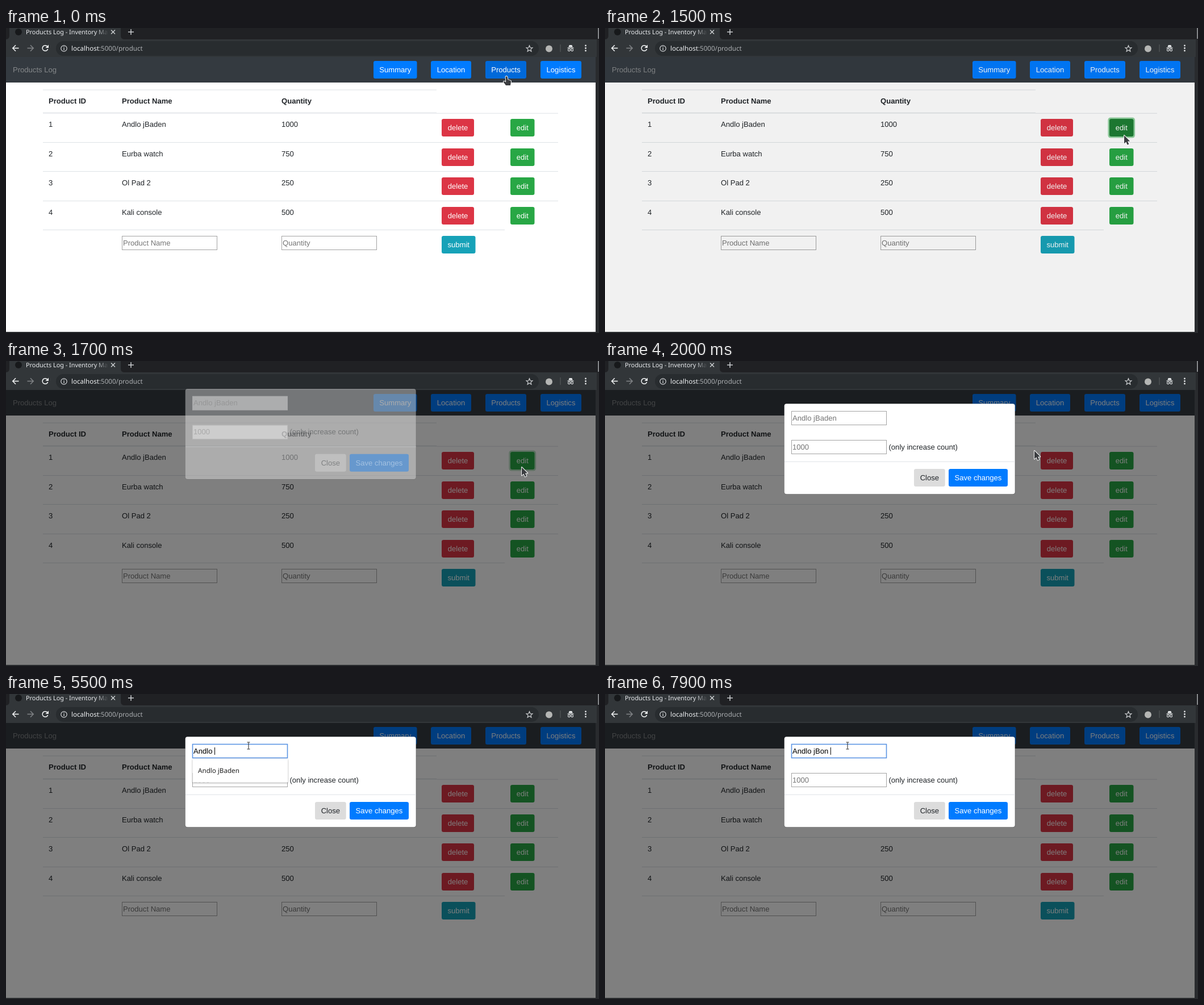
An HTML page with a canvas for the animation above (8000 ms loop, 1044 by 537 pixels).

```html
<!DOCTYPE html>
<html lang="en">
<head>
<meta charset="utf-8">
<title>Products Log</title>
<style>
html, body { margin: 0; width: 100%; height: 100%; overflow: hidden; background: #292b2e; }
canvas { display: block; }
</style>
</head>
<body>
<canvas id="stage" width="1044" height="537"></canvas>
<script>
const ctx = document.getElementById('stage').getContext('2d');
ctx.textRendering = 'geometricPrecision';

const LOOP = 8000, STEP = 100;
const SANS = '13.07px "Liberation Sans", Arial, sans-serif';
const BOLD = 'bold ' + SANS;
const NOTO = '"Noto Sans", sans-serif';
const INK = '#212529', HINT = '#757575', RULE = '#dee2e6';
const BLUE = [0, 123, 255], BLUE_HOVER = [0, 105, 217];
const GREEN = [40, 167, 69], GREEN_HOVER = [33, 136, 56], GREEN_DOWN = [30, 126, 52];
const RED = [220, 53, 69], TEAL = [23, 162, 184], GREY = [220, 220, 220];

const ROWS = [
  ['Andlo jBaden', '1000'],
  ['Eurba watch', '750'],
  ['Ol Pad 2', '250'],
  ['Kali console', '500']
];
const ALL = ['A', 'a product', 'Andlo jBaden', 'Eurba watch', 'Anor Velbune 2', 'Corveng TV'];
const WITH_A = ['A', 'a product', 'Andlo jBaden', 'Anor Velbune 2', 'a test'];

// [time, typed text]
const TYPING = [
  [4500, 'A'], [4900, 'And'], [5300, 'Andlo'], [5500, 'Andlo '], [6600, 'Andlo j'],
  [7100, 'Andlo jB'], [7500, 'Andlo jBo'], [7700, 'Andlo jBon'], [7900, 'Andlo jBon ']
];

// [time, x, y] of the pointer's hot spot
const PATH = [
  [0, 881, 85], [100, 882, 90], [200, 888, 107], [300, 900, 137], [400, 911, 168],
  [500, 917, 186], [600, 918, 190], [900, 918, 190], [1000, 914, 189], [1600, 914, 189],
  [1700, 908, 187], [1800, 882, 181], [1900, 828, 170], [2000, 756, 158], [2100, 637, 118],
  [2200, 560, 107], [2300, 508, 103], [2400, 487, 102], [2800, 487, 102], [2900, 427, 91]
];

const ramp = (t, a, b) => Math.min(1, Math.max(0, (t - a) / (b - a)));
const mix = (a, b, k) => a.map((v, i) => v + (b[i] - v) * k);
const rgb = c => `rgb(${c.map(Math.round).join(',')})`;

function rect(x, y, w, h, color) {
  ctx.fillStyle = color;
  ctx.fillRect(x, y, w, h);
}

function round(x, y, w, h, r, color) {
  ctx.beginPath();
  ctx.roundRect(x, y, w, h, r);
  ctx.fillStyle = color;
  ctx.fill();
}

function text(s, x, y, color = INK, font = SANS, align = 'left') {
  ctx.font = font;
  ctx.textAlign = align;
  ctx.fillStyle = color;
  ctx.fillText(s, x, y);
}

function line(points, color, width, close) {
  ctx.beginPath();
  points.forEach(([x, y]) => ctx.lineTo(x, y));
  if (close) ctx.closePath();
  ctx.strokeStyle = color;
  ctx.lineWidth = width;
  ctx.stroke();
}

function circle(x, y, r, color) {
  ctx.beginPath();
  ctx.arc(x, y, r, 0, 7);
  ctx.fillStyle = color;
  ctx.fill();
}

function button(label, x, y, w, color, ink = '#fff') {
  round(x, y, w, 31, 3.3, rgb(color));
  text(label, x + w / 2, y + 19.8, ink, SANS, 'center');
}

function input(x, y, value, color = HINT, focus = false) {
  rect(x, y, 168, 25, '#fff');
  ctx.strokeStyle = focus ? '#5b94e3' : '#a3a3a3';
  ctx.lineWidth = focus ? 1.6 : 1;
  ctx.strokeRect(x + .5, y + .5, 167, 24);
  text(value, x + 2, y + 16.7, color);
}

function chrome() {
  rect(0, 0, 1044, 537, '#292b2e');
  rect(0, 0, 1044, 20, '#202124');
  rect(1042, 0, 2, 19, '#85878a');
  rect(0, 20, 1040, 31, '#323639');
  ctx.beginPath();
  ctx.moveTo(0, 20);
  ctx.quadraticCurveTo(6, 20, 6, 13);
  ctx.lineTo(6, 0);
  ctx.lineTo(202, 0);
  ctx.lineTo(202, 13);
  ctx.quadraticCurveTo(202, 20, 208, 20);
  ctx.fill();

  circle(22, 7, 6, '#17191b');
  const fade = ctx.createLinearGradient(158, 0, 180, 0);
  fade.addColorStop(0, '#e8eaed');
  fade.addColorStop(1, 'rgba(232,234,237,0)');
  text('Products Log - Inventory Man', 35, 10.8, fade, '10.87px ' + NOTO);
  line([[185, 3.5], [192, 10.5]], '#d5d7da', 1.3);
  line([[192, 3.5], [185, 10.5]], '#d5d7da', 1.3);
  line([[215, 7], [225, 7]], '#d5d7da', 1.4);
  line([[220, 2], [220, 12]], '#d5d7da', 1.4);

  arrow(17, 1, '#f1f3f4');
  arrow(43, -1, '#7f8285');
  ctx.beginPath();
  ctx.arc(69, 35.5, 4.8, .3, 5.5);
  ctx.strokeStyle = '#f1f3f4';
  ctx.lineWidth = 1.6;
  ctx.stroke();
  ctx.beginPath();
  ctx.moveTo(75, 29.5);
  ctx.lineTo(75, 35);
  ctx.lineTo(69.5, 35);
  ctx.fillStyle = '#f1f3f4';
  ctx.fill();

  round(88, 23, 850, 26, 13, '#282c2f');
  ctx.beginPath();
  ctx.arc(102, 36, 5.2, 0, 7);
  ctx.strokeStyle = '#d5d7da';
  ctx.lineWidth = 1.2;
  ctx.stroke();
  rect(101.4, 35, 1.3, 4, '#d5d7da');
  rect(101.4, 32.7, 1.3, 1.3, '#d5d7da');
  text('localhost', 115, 39.8, '#eef0f2', '11.6px ' + NOTO);
  text(':5000/product', 115 + ctx.measureText('localhost').width, 39.8, '#abaeb1', '11.6px ' + NOTO);

  const star = Array.from({ length: 10 }, (_, i) => {
    const a = i * Math.PI / 5 - Math.PI / 2, r = i % 2 ? 2.5 : 5.8;
    return [921.5 + r * Math.cos(a), 36.5 + r * Math.sin(a)];
  });
  line(star, '#d5d7da', 1.1, true);
  circle(956, 36.5, 6, '#b5b6b4');
  rect(975.5, 29, 1, 13, '#5b5e61');
  incognito();
  [31, 35.5, 40].forEach(y => circle(1020.5, y, 1.4, '#e4e6e8'));
}

function arrow(x, dir, color) {
  line([[x + 5.5 * dir, 35.5], [x - 5 * dir, 35.5]], color, 1.6);
  line([[x, 30.3], [x - 5.2 * dir, 35.5], [x, 40.7]], color, 1.6);
}

function incognito() {
  const c = '#e4e6e8';
  rect(988.5, 34.5, 11, 1.3, c);
  ctx.beginPath();
  ctx.moveTo(990.3, 33.8);
  ctx.lineTo(991.7, 30);
  ctx.lineTo(996.3, 30);
  ctx.lineTo(997.7, 33.8);
  ctx.fill();
  ctx.strokeStyle = c;
  ctx.lineWidth = 1.1;
  for (const x of [991.3, 996.7]) {
    ctx.beginPath();
    ctx.arc(x, 38.7, 1.9, 0, 7);
    ctx.stroke();
  }
  rect(993, 38, 2, 1, c);
}

function page(t) {
  rect(0, 51, 1038, 484, '#fff');
  rect(0, 51, 1038, 45, '#343a40');
  text('Products Log', 12, 77.5, '#85888a');
  button('Summary', 647, 58, 76.5, BLUE);
  button('Location', 748, 58, 71, BLUE);
  button('Products', 844, 58, 72, mix(BLUE_HOVER, BLUE, ramp(t, 90, 240)));
  button('Logistics', 941, 58, 72, BLUE);

  rect(65, 108.5, 693, 1, RULE);
  rect(65, 148.8, 693, 1.6, RULE);
  rect(758, 149.7, 214, 1, RULE);
  text('Product ID', 75, 133, INK, BOLD);
  text('Product Name', 204, 133, INK, BOLD);
  text('Quantity', 485, 133, INK, BOLD);

  ROWS.forEach(([name, count], i) => {
    const y = 150 + i * 51.5;
    text(i + 1, 75, y + 24.2);
    text(name, 204, y + 24.2);
    text(count, 485, y + 24.2);
    const top = Math.round(y + 10);
    button('delete', 767, top, 57, RED);
    if (i) button('edit', 888, top, 42.5, GREEN);
    else firstEdit(t, top);
    rect(65, Math.floor(y + 51.3), i < 3 ? 907 : 813, 1, RULE);
  });

  input(204, 366, 'Product Name');
  input(485, 366, 'Quantity');
  button('submit', 767, 366, 59.5, TEAL);
}

function firstEdit(t, y) {
  let color = mix(GREEN, GREEN_HOVER, ramp(t, 350, 500));
  if (t >= 1300) color = mix(GREEN_HOVER, GREEN_DOWN, ramp(t, 1250, 1400));
  if (t >= 1500) color = mix(GREEN_DOWN, GREEN, ramp(t, 1500, 1650));
  const ring = ramp(t, 1250, 1400) * (1 - ramp(t, 1650, 1800));
  if (ring) round(885.4, y - 2.6, 47.7, 36.2, 5, `rgba(40,167,69,${ring / 2})`);
  button('edit', 888, y, 42.5, color);
}

function modal(t) {
  const p = ramp(t, 1640, 1940);
  if (!p) return;
  const focus = t >= 3100;
  let typed = '';
  for (const [at, s] of TYPING) if (t >= at) typed = s;

  ctx.save();
  ctx.globalAlpha = ramp(t, 1640, 1790);
  ctx.translate(0, -41 * (1 - p) ** 2);
  round(315, 74.5, 407.5, 160.5, 4.5, 'rgba(0,0,0,.2)');
  round(315.7, 75.3, 406, 159, 4, '#fff');
  input(328, 88, typed || ROWS[0][0], typed ? '#000' : HINT, focus);
  input(328, 139, '1000');
  text('(only increase count)', 499.5, 155.5);
  rect(316, 176.7, 406, 1, RULE);
  button('Close', 544, 190, 54.7, GREY, INK);
  button('Save changes', 605, 190, 104, BLUE);
  ctx.restore();

  if (focus && !(t >= 3800 && t < 4500) && !(t >= 6200 && t < 6600)) {
    ctx.font = SANS;
    rect(330 + ctx.measureText(typed).width, 94, 1, 13, '#000');
  }
  if (t >= 3200 && t < 7500) {
    suggest(t < 4500 ? ALL : t < 4900 ? WITH_A : [ROWS[0][0]]);
  }
}

function suggest(items) {
  const h = items.length * 29.45 + 12.3;
  ctx.save();
  ctx.shadowColor = 'rgba(0,0,0,.35)';
  ctx.shadowBlur = 3;
  ctx.shadowOffsetY = 1;
  round(328.5, 114, 167.5, h, 1.5, '#fff');
  ctx.restore();
  items.forEach((s, i) => text(s, 338, 138.8 + i * 29.45, '#222', '11.65px ' + NOTO));
}

function pointer(t) {
  let i = PATH.findIndex(k => k[0] > t);
  if (i < 0) i = PATH.length;
  const a = PATH[i - 1], b = PATH[i] || a;
  const k = a === b ? 0 : ramp(t, a[0], b[0]);
  const x = a[1] + (b[1] - a[1]) * k, y = a[2] + (b[2] - a[2]) * k;
  const hand = t < 1484 && (y < 89 || y > 160);
  const beam = t > 2000 && x < 496;
  ctx.save();
  ctx.translate(x, y);
  ctx.lineJoin = 'round';
  if (beam) ibeam();
  else outline(hand
    ? 'M-1.5 1Q0-1 1.5 1L2.5 6L7 7.5Q8.5 8 8 10L7 16H-1L-5 10.5Q-5.5 8-3 9L-.8 10.5Z'
    : 'M0 0V14.5L3.4 11.5L5.7 16.7L8.4 15.5L6.1 10.5H10.3Z');
  ctx.restore();
}

function outline(d) {
  const shape = new Path2D(d);
  ctx.strokeStyle = '#fff';
  ctx.lineWidth = 1.8;
  ctx.stroke(shape);
  ctx.fillStyle = '#3b3d40';
  ctx.fill(shape);
}

function ibeam() {
  line([[0, -5.5], [0, 5.5]], '#333', 1.1);
  for (const y of [-6, 6]) line([[-2.5, y], [2.5, y]], '#333', 1.1);
}

function draw(now) {
  const t = Math.floor(now % LOOP / STEP) * STEP;
  chrome();
  page(t);
  rect(0, 51, 1038, 484, `rgba(0,0,0,${ramp(t, 1484, 1634) / 2})`);
  modal(t);
  pointer(t);
}

const start = performance.now();
function tick() {
  draw(performance.now() - start);
  requestAnimationFrame(tick);
}
tick();
</script>
</body>
</html>
```
